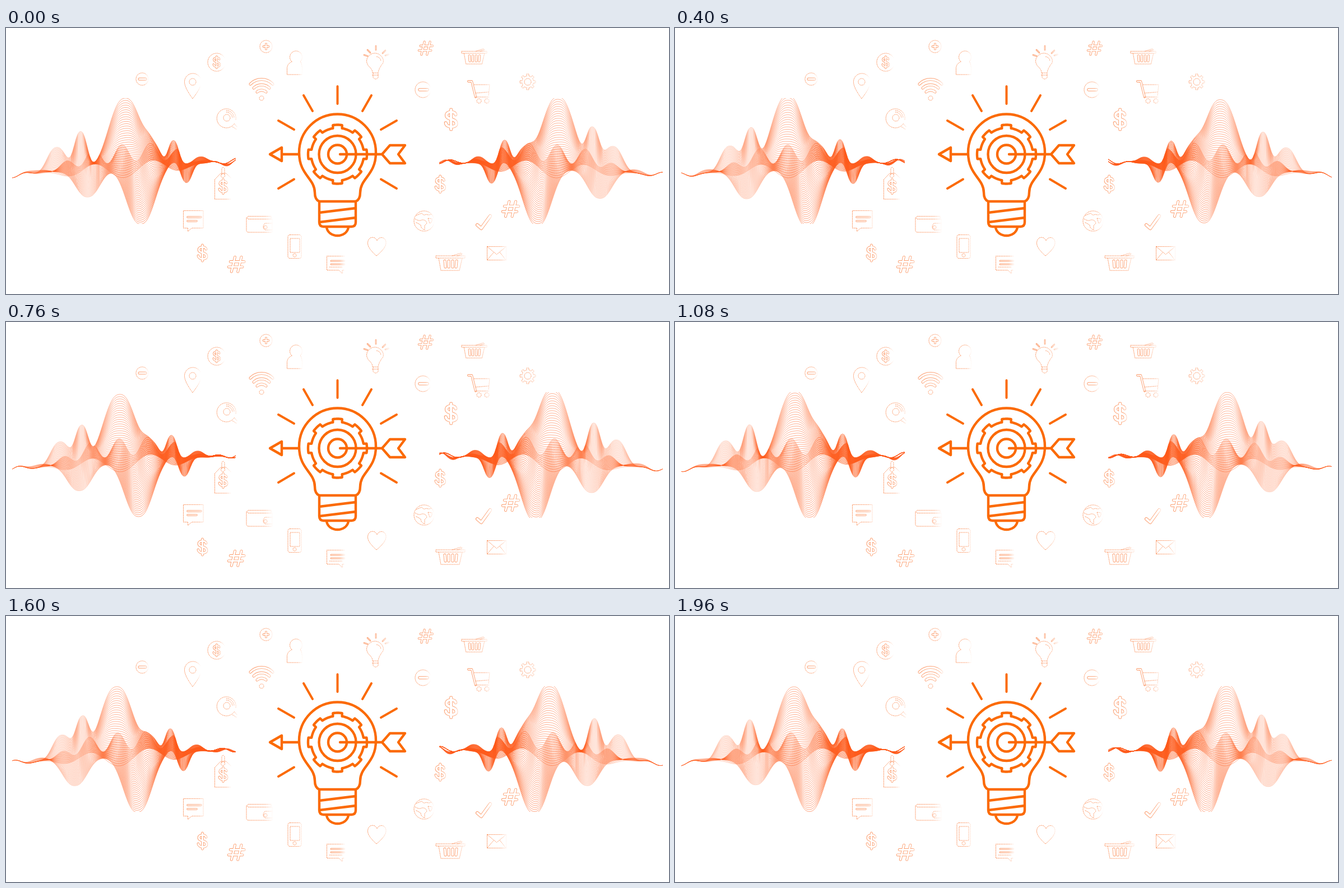
These frames come from a looping animation (1183x474 px, 2 s). An HTML page with a canvas:

```html
<!DOCTYPE html>
<html lang="en">
<head>
<meta charset="utf-8">
<title>Idea waves</title>
<style>
  html, body { margin: 0; width: 100%; height: 100%; overflow: hidden; background: #fff; }
  canvas { display: block; }
</style>
</head>
<body>
<canvas id="stage" width="1183" height="474"></canvas>
<script>
const W = 1183, H = 474, PERIOD = 1000, STEP = 40;
const stage = document.getElementById('stage').getContext('2d');

// ---------- static picture: icons and light bulb ----------
const backdrop = document.createElement('canvas');
backdrop.width = W;
backdrop.height = H;
const art = backdrop.getContext('2d');

const circle = (x, y, r) =>
  `M${x + r} ${y}a${r} ${r} 0 1 1 ${-2 * r} 0a${r} ${r} 0 1 1 ${2 * r} 0`;

function gear(x, y, inner, outer) {
  let path = '';
  for (let deg = 0; deg < 360; deg++) {
    const fromTooth = Math.abs((deg + 22.5) % 45 - 22.5);
    const r = fromTooth < 10 ? outer : inner, a = deg * Math.PI / 180;
    path += `${deg ? 'L' : 'M'}${x + r * Math.cos(a)} ${y + r * Math.sin(a)}`;
  }
  return path + 'z';
}

// Thin outlines plus hollow "tube" strokes, fading out at the right side.
function icon(x, y, width, thin, tube = '', scale = 1, tubeWidth = 5) {
  art.save();
  art.translate(x, y);
  art.scale(scale, scale);
  art.lineCap = art.lineJoin = 'round';
  const fade = art.createLinearGradient(0, 0, width, 0);
  fade.addColorStop(0, 'rgba(250,110,40,.72)');
  fade.addColorStop(.65, 'rgba(250,110,40,.6)');
  fade.addColorStop(.95, 'rgba(250,110,40,0)');
  const hollow = new Path2D(tube);
  art.strokeStyle = fade;
  art.lineWidth = tubeWidth;
  art.stroke(hollow);
  art.strokeStyle = '#fff';
  art.lineWidth = tubeWidth - 1.8 / scale;
  art.stroke(hollow);
  art.strokeStyle = fade;
  art.lineWidth = 1 / scale;
  art.setLineDash([2.2, .8]);
  art.lineCap = 'butt';
  art.stroke(new Path2D(thin));
  art.restore();
}

const DOLLAR = 'M17 9c-1-5-13-5-13 1c0 7 14 4 14 12c0 6-14 6-15-1M10.5 2v28';
const HASH = 'M13 3L7 28M24 3L18 28M5 11H29M2 20H26';
const BASKET = 'M1 4h52v4h-52zM6 8l4 22h33l5-22M30 4l16-5l2 2l-9 3';
const BASKET_BARS = 'M17 13l1 11M24 13v11M31 13v11M38 13l-1 11';
const CHAT = 'M36 .5H.5v31h8v6l7-6H36z';

const dollar = (x, y, scale) => icon(x, y, 25, '', DOLLAR, scale, 4.8);
const hash = (x, y, scale) => icon(x, y, 42, '', HASH, scale, 4.6);

function drawIcons() {
  icon(232, 80, 24, circle(11, 11, 11), 'M6 11h11');
  icon(730, 96, 29, circle(14, 14, 14), 'M8 14h14', 1, 5.5);
  icon(453, 22, 25, circle(11, 11, 11), 'M6.5 11h9M11 6.5v9', 1, 4);
  icon(360, 45, 32, circle(16, 16, 16));
  dollar(368, 49, .75);
  icon(501, 40, 30, 'M9 20a11 11 0 1 1 15 0q4 3 4 23H.5V31q1-8 9-11');
  icon(318, 81, 31, circle(15, 15, 6) + 'M15 45Q.5 25 .5 15a15 15 0 0 1 30 0q0 10-15.500 30');
  icon(433, 89, 52, circle(23, 36, 4), 'M3 11a28 28 0 0 1 40 0M9 18a20 20 0 0 1 28 0M15 25a12 12 0 0 1 16 0', 1, 5);
  icon(378, 143, 40, circle(16, 17, 6) + 'M29 28a17 17 0 1 1 3-7M26 33l8 5M29 27l6 7M15 7a11 11 0 0 1 11 10M15 4a14 14 0 0 1 14 13');
  icon(372, 247, 32, circle(15, 16, 3.5) + 'M.5 58V23L11 12h10l11 11v35zM13 15V4q2-6 5 0v11');
  dollar(378, 268, .9);
  icon(316, 325, 44, CHAT, 'M8 12h24M8 19h16', 1, 3.5);
  icon(429, 335, 50, 'M44 4V.5H3q-4 2 0 5h43v23.500H4q-4 0-4-4V3M46 13H33q-6 7 0 12h13' + circle(34, 20, 3));
  icon(503, 368, 29, 'M4 .5h16q4 0 4 4v34q0 4-4 4H4q-4 0-4-4v-34q0-4 4-4M4 7h17v25H4z' + circle(12, 37, 3));
  dollar(340, 385, 1);
  dollar(764, 262, 1.02);
  dollar(781, 143, 1.25);
  hash(395, 405, 1.04);
  hash(884, 306, 1.06);
  hash(735, 22, .9);
  icon(572, 406, 36, 'M32 .5H.5v25H22l6 6v-6h4M5 20h23', 'M8 9h24M8 15h24', 1, 3);
  icon(645, 373, 39, 'M16 33Q1 20 .5 11C0-2 14-3 17 6C21-3 34-1 33 11Q32 20 16 33');
  icon(728, 326, 38, circle(18, 18, 18) + 'M4 8q7-3 10-4q3 5 8 2q4 2 9 0M2 14q7 5 12 2q7-1 9 6l-4 4v8q-7-3-7-9l-9-5M25 13l7 1q1 6-4 8z');
  icon(838, 331, 33, '', 'M3 20l7 6L26 4', 1, 6);
  icon(858, 389, 38, 'M.5.5h34v24H.5zl17 14l17-14M.5 24.500l12-14M34 24.500l-11-14');
  icon(766, 402, 62, BASKET, BASKET_BARS);
  icon(812, 38, 62, BASKET, BASKET_BARS, .87);
  icon(823, 93, 48, circle(21, 37, 4) + circle(35, 37, 4) + 'M12 8h28l-2 20M14 30h25M15 23l24-2', 'M2 2h6l7 28', 1, 4);
  icon(917, 82, 34, gear(14, 14, 10.5, 14) + circle(14, 14, 6));
  icon(638, 31, 50, 'M16 49Q16 43 10 38Q3 30 7 22Q14 11 26 15Q37 21 35 31Q27 41 26 49zM17 49v8q5 6 9 0v-8M15 53h12M23 20q7 1 8 8',
    'M22 1v7M7 8l5 5M1 17l6 2M39 9l-5 5M45 16l-6 2', 1, 2.6);
}

function drawBulb() {
  const stroke = (path, width = 4.4) => {
    art.lineWidth = width;
    art.stroke(new Path2D(path));
  };
  art.strokeStyle = '#fb6a05';
  art.lineCap = art.lineJoin = 'round';
  stroke('M591.5 104V135M531 120l16 28M652 120l-16 28M486 165l28 16M697 165l-28 16M486 286l28-16.500M697 286l-28-16.500', 4);
  stroke('M559 309Q551 306 551 293C551 268 523 262 523 222A68.500 68.500 0 0 1 660 222C660 262 632 268 632 293Q632 306 624 309z');
  stroke('M559 310V346Q559 354 567 354H616Q624 354 624 346V310M559 329L624 321M559 346L624 338M572 355C575 375 608 375 611 355');
  stroke(gear(591.5, 225, 47, 52.5));
  stroke(circle(591.5, 225, 33) + circle(591.5, 225, 16.5));
  stroke('M521 225H492M471 225L492 213V237zM596 225H671M671 225L685 209H712L700 225L712 241H685z');
}

// ---------- waves ----------
const LEFT = 11, RIGHT = 412, DX = 3, LINES = 34;
const turn = phase => Math.cos(2 * Math.PI * phase);
const bell = (d, power = 2.4) => Math.exp(-(Math.abs(d) ** power));

// Bumps above and below the axis: centre, width, height, sideways drift.
const CRESTS = [
  [95, 22, 45, -5], [134.5, 15, 70, -1.5], [205, 38, 126, 8],
  [260, 18, 30, 3], [296, 12, 44, 3], [343, 15, 12, 4]
];
const TROUGHS = [
  [60, 22, -6, 0], [135, 28, 48, 12], [238, 33, 103, 3],
  [298, 14, -7, 2], [319, 13, 34, 3], [388, 12, 4, 4]
];

// Each bump circles: it drifts sideways and swells a quarter turn later.
const swell = (bumps, x, phase) => bumps.reduce((sum, [centre, width, height, drift]) =>
  sum + height * (1 + .04 * turn(phase - .3))
    * bell((x - centre - drift * turn(phase - .06)) / width), 0);

// Sloping axis whose two loose ends flutter.
const axis = (x, phase, lag) => 262 - (x - LEFT) / 16
  + 5 * turn(phase - (x - LEFT) / 56) * bell((x - LEFT) / 35, 2)
  - 5 * turn(phase - lag - (RIGHT - x) / 48) * bell((RIGHT - x) / 40, 2);

function edgesAt(x, phase) {
  const upperAxis = axis(x, phase, 0), lowerAxis = axis(x, phase, .13);
  const taper = bell((x - 215) / 115, 4), shift = 4 * turn(phase - .06);
  const top = upperAxis - swell(CRESTS, x, phase);
  const bottom = lowerAxis + swell(TROUGHS, x, phase);
  const upperFold = upperAxis + taper * (3 + 14 * turn((x - 206 - shift) / 105));
  const lowerFold = lowerAxis - taper * (26 + 16 * turn((x - 203 - shift) / 51));
  return { top, bottom, upperFold: Math.max(top, upperFold), lowerFold: Math.max(top, lowerFold) };
}

function drawRibbon(edges, from, to) {
  for (let i = 0; i <= LINES; i++) {
    stage.beginPath();
    edges.forEach((e, k) => stage.lineTo(LEFT + k * DX, e[from] + (e[to] - e[from]) * i / LINES));
    stage.stroke();
  }
}

const ink = stage.createLinearGradient(LEFT, 0, RIGHT, 0);
for (const [stop, alpha] of [[0, .03], [.12, .12], [.25, .36], [.5, .55], [.68, .75], [.9, .6], [1, .12]])
  ink.addColorStop(stop, `rgba(253,88,24,${alpha})`);

function drawWave(phase, mirrored) {
  const edges = [];
  for (let x = LEFT; x <= RIGHT; x += DX) edges.push(edgesAt(x, phase));
  stage.save();
  if (mirrored) stage.transform(-1, 0, 0, 1, W, 0);
  stage.beginPath();
  stage.rect(0, 125, 420, 224);
  stage.clip();
  stage.strokeStyle = ink;
  stage.lineWidth = .85;
  drawRibbon(edges, 'top', 'upperFold');
  drawRibbon(edges, 'lowerFold', 'bottom');
  stage.restore();
}

function render(now) {
  const phase = Math.floor(now / STEP) * STEP % PERIOD / PERIOD;
  stage.fillStyle = '#fff';
  stage.fillRect(0, 0, W, H);
  stage.drawImage(backdrop, 0, 0);
  drawWave(phase, false);
  drawWave(phase + .5, true);
}

drawIcons();
drawBulb();
const start = performance.now();
render(0);
requestAnimationFrame(function tick() {
  render(performance.now() - start);
  requestAnimationFrame(tick);
});
</script>
</body>
</html>
```
